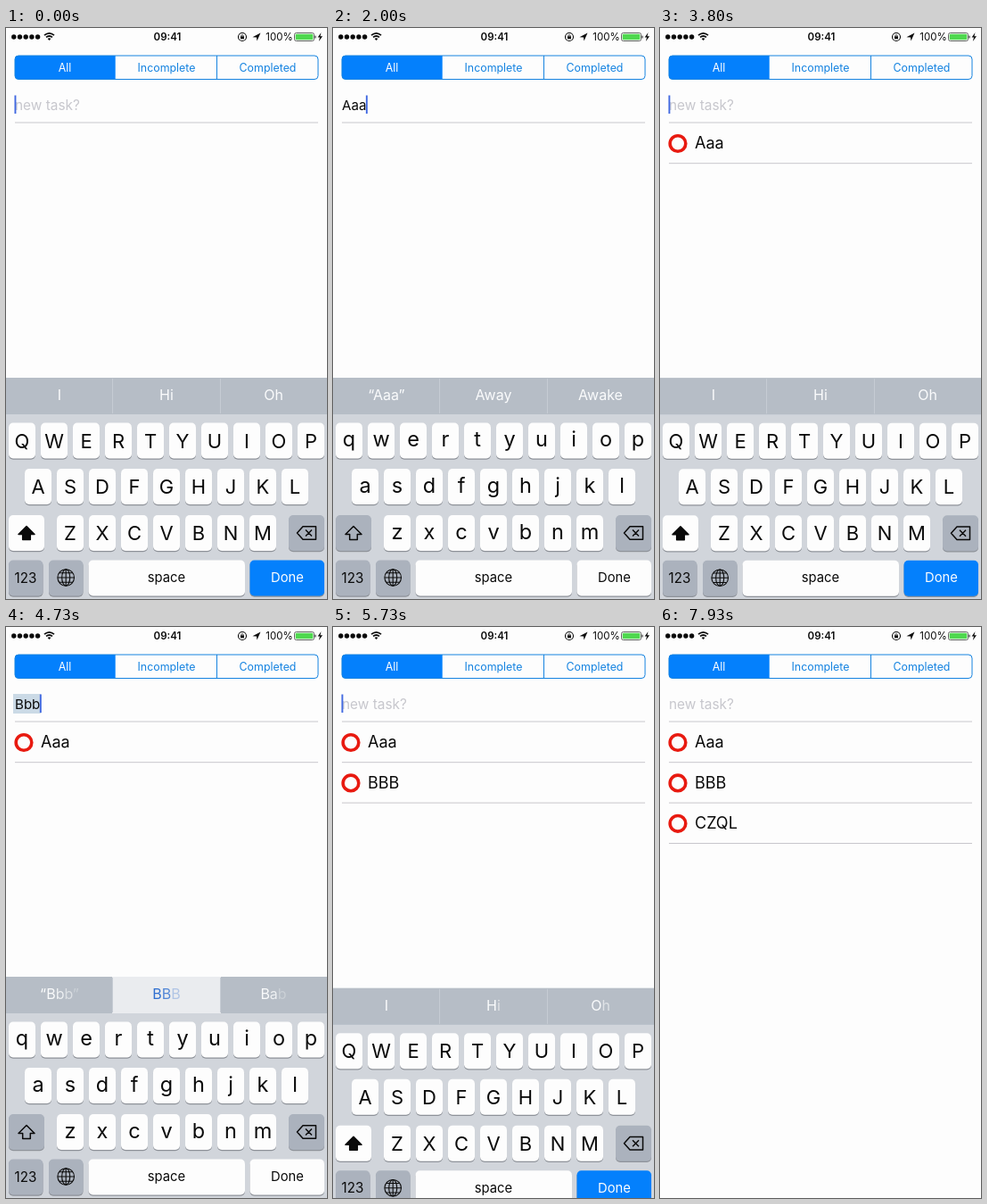
Animation, 360 px wide and 640 px high, one loop 8000 ms. Source, as an HTML page:

```html
<!DOCTYPE html>
<html lang="en">
<head>
<meta charset="utf-8">
<title>Task list</title>
<style>
  html, body { margin: 0; width: 100%; height: 100%; overflow: hidden; background: #fdfdfd; }
  svg { display: block; width: 360px; height: 640px; font-family: Inter, Roboto, sans-serif; }
</style>
</head>
<body>
<svg id="stage" viewBox="0 0 360 640"></svg>
<script>
const LOOP = 8000, KB_TOP = 392, KB_TRAVEL = 250, ROW_PITCH = 45.4;
const BLUE = '#0480fc', TINT = '#1583e0', INK = '#0a0a0a', KEY = '#fdfdfd', GREY = '#abb2bd', HINT = '#fafbfc';
const stage = document.getElementById('stage');

function add(parent, tag, attrs, content) {
  const node = document.createElementNS('http://www.w3.org/2000/svg', tag);
  for (const name in attrs) node.setAttribute(name, attrs[name]);
  if (content !== undefined) node.textContent = content;
  parent.append(node);
  return node;
}
const set = (node, attrs) => { for (const name in attrs) node.setAttribute(name, attrs[name]); };
const show = (node, on) => set(node, { visibility: on ? 'visible' : 'hidden' });
const clamp = v => Math.max(0, Math.min(1, v));
const rect = (parent, x, y, width, height, fill, more = {}) =>
  add(parent, 'rect', { x, y, width, height, fill, ...more });
const label = (parent, x, y, size, fill, content, more = {}) =>
  add(parent, 'text', { x, y, 'font-size': size, fill, 'text-anchor': 'middle', ...more }, content);
const path = (parent, d, more = {}) =>
  add(parent, 'path', { d, fill: 'none', stroke: INK, 'stroke-width': 1.5, 'stroke-linejoin': 'round', ...more });
const left = { 'text-anchor': 'start' };

function drawStatusBar() {
  for (let i = 0; i < 5; i++) add(stage, 'circle', { cx: 8.8 + i * 6.7, cy: 10, r: 2.7, fill: INK });
  path(stage, 'M43 8.2Q48.5 3.6 54 8.2M45 10.4Q48.5 7.6 52 10.4', { 'stroke-width': 1.7 });
  path(stage, 'M46.6 12Q48.5 10.7 50.4 12L48.5 14Z', { fill: INK, stroke: 'none' });
  label(stage, 181, 14, 11.5, INK, '09:41', { 'font-weight': 600 });
  add(stage, 'circle', { cx: 265, cy: 10, r: 4.5, fill: 'none', stroke: INK, 'stroke-width': 1.1 });
  rect(stage, 263, 9.3, 4, 3, INK);
  path(stage, 'M263.8 9.5V8.4Q265 6.8 266.2 8.4V9.5', { 'stroke-width': .8 });
  path(stage, 'M276.5 10.2L285.5 5.5L281.5 14.5L281 10.6Z', { fill: INK, stroke: 'none' });
  label(stage, 306.5, 14, 11.5, INK, '100%');
  rect(stage, 323.5, 5.5, 22, 9, 'none', { rx: 2, stroke: '#555', 'stroke-width': .9 });
  rect(stage, 324.7, 6.7, 19.6, 6.6, '#4fd84f', { rx: 1 });
  rect(stage, 346.3, 8.5, 1.4, 3, '#555', { rx: .6 });
  path(stage, 'M353.5 5L349.6 10.6H352L350.8 15L355 9.2H352.4Z', { fill: INK, stroke: 'none' });
}

function drawTabs() {
  path(stage, 'M122.7 31H14Q10 31 10 35V53.5Q10 57.5 14 57.5H122.7Z', { fill: BLUE, stroke: 'none' });
  rect(stage, 10, 31, 340, 26.5, 'none', { rx: 4, stroke: TINT, 'stroke-width': 1 });
  path(stage, 'M236.5 31V57.5', { stroke: TINT, 'stroke-width': 1 });
  label(stage, 66, 48.5, 12.4, KEY, 'All');
  label(stage, 180, 48.5, 12.4, TINT, 'Incomplete');
  label(stage, 293.5, 48.5, 12.4, TINT, 'Completed');
}

const rule = (parent, y) => path(parent, `M10 ${y}H350`, { stroke: '#c8c7cc', 'stroke-width': 1 });

drawStatusBar();
drawTabs();
rule(stage, 106);

const selection = rect(stage, 8, 75, 32, 22, '#cbdae6');
const placeholder = label(stage, 10, 91.5, 15.4, '#c7c7cd', 'new task?', left);
const field = label(stage, 10, 92, 15.1, INK, '', left);
const cursor = rect(stage, 9.5, 75.5, 1.9, 20.5, '#4169e1');

const tasks = [['Aaa', 2100], ['BBB', 4850], ['CZQL', 7430]].map(([name, time], i) => {
  const group = add(stage, 'g', {}), y = i * ROW_PITCH;
  add(group, 'circle', { cx: 20, cy: 129.5 + y, r: 8.8, fill: 'none', stroke: '#e81a10', 'stroke-width': 3.6 });
  label(group, 39, 135.3 + y, 18, INK, name, left);
  rule(group, 151.7 + y);
  return { group, time };
});

// Keyboard
const board = add(stage, 'g', {});
rect(board, 0, KB_TOP, 360, 250, '#d1d5db');
rect(board, 0, KB_TOP, 360, 41, '#b6bdc6');
const picked = rect(board, 119, KB_TOP, 122, 41, '#eaecef');
for (const x of [119.5, 240.5]) path(board, `M${x} 393V432`, { stroke: '#c6ccd4', 'stroke-width': 1 });
const hints = [60, 180, 300].map(x => label(board, x, 417, 16, HINT, ''));

function drawKey(x, y, width, fill = KEY) {
  rect(board, x, y + 1.2, width, 40, '#8e9299', { rx: 5 });
  return rect(board, x, y, width, 40, fill, { rx: 5 });
}
const letters = {};
['QWERTYUIOP', 'ASDFGHJKL', 'ZXCVBNM'].forEach((row, r) => {
  const first = [18, 36, 72][r], top = [442.5, 494, 546][r];
  [...row].forEach((char, i) => {
    const x = first + i * 36;
    drawKey(x - 15, top, 30);
    letters[char] = { x, top, node: label(board, x, top + 28, 22, INK, char) };
  });
});
const shiftKey = drawKey(3, 546, 40);
const shiftIcon = path(board, 'M23 558.5L32 567.5H27.3V573.5H18.7V567.5H14Z');
drawKey(317, 546, 40, GREY);
path(board, 'M333 558.8H347.5V573.2H333L326.5 566ZM336 562.5L343 569.5M343 562.5L336 569.5');
drawKey(3, 596.5, 38.5, GREY);
label(board, 22, 621.5, 15.2, INK, '123');
drawKey(48, 596.5, 38.5, GREY);
add(board, 'circle', { cx: 67.2, cy: 616, r: 9.3, fill: 'none', stroke: INK, 'stroke-width': 1.1 });
add(board, 'ellipse', { cx: 67.2, cy: 616, rx: 4.5, ry: 9.3, fill: 'none', stroke: INK, 'stroke-width': 1.1 });
path(board, 'M67.2 606.7V625.3M58 616H76.5M60 610.7H74.4M60 621.3H74.4', { 'stroke-width': 1.1 });
drawKey(92.5, 596.5, 175.5);
label(board, 180, 621, 14.8, INK, 'space');
const doneKey = drawKey(273.5, 596.5, 83.5, BLUE);
const doneText = label(board, 315.5, 621, 14.8, KEY, 'Done');

// Enlarged key, drawn around the centre of the key and its top edge
const popup = add(board, 'g', {});
const balloon = 'M-21 -62H21Q27 -62 27 -56V-17Q27 -9 21 -3Q15 3 15 9V35Q15 40 10 40H-10Q-15 40 -15 35V9Q-15 3 -21 -3Q-27 -9 -27 -17V-56Q-27 -62 -21 -62Z';
path(popup, balloon, { fill: '#8e9299', stroke: 'none', opacity: .55, transform: 'translate(0 1.5)' });
path(popup, balloon, { fill: KEY, stroke: '#bfc3ca', 'stroke-width': .6 });
const popupText = label(popup, .5, -21, 37, INK, '', { 'font-weight': 300 });

// Each step overrides part of the state from its time on
const START = ['I', 'Hi', 'Oh'];
const steps = [
  [0, { text: '', caps: true, pop: '', pressed: false, pick: false, focus: true, hints: START, since: -500 }],
  [620, { pop: 'A' }], [700, { text: 'A', caps: false, hints: ['“A”', 'An', 'Am'] }], [770, { pop: '' }],
  [1000, { pop: 'a' }], [1070, { text: 'Aa', hints: ['“Aa”', 'As', 'Am'] }], [1140, { pop: '' }],
  [1330, { pop: 'a' }], [1400, { text: 'Aaa', hints: ['“Aaa”', 'Away', 'Awake'] }], [1470, { pop: '' }],
  [1930, { pressed: true }],
  [2060, { pressed: false, text: '', focus: false }],
  [3070, { focus: true, caps: true }],
  [3200, { hints: ['“A”', 'An', 'Aw'] }], [3420, { hints: START }],
  [3900, { pop: 'B' }], [3970, { text: 'B', caps: false, hints: ['“B”', 'But', 'Be'] }], [4040, { pop: '' }],
  [4150, { pop: 'b' }], [4220, { text: 'Bb', hints: ['“Bb”', 'Be', 'By'] }], [4290, { pop: '' }],
  [4400, { pop: 'b' }], [4480, { text: 'Bbb' }], [4550, { pop: '' }],
  [4600, { hints: ['“Bbb”', 'BBB', 'Bab'], pick: true }], [4680, { pressed: true }],
  [4800, { pressed: false, pick: false, text: '', focus: false }],
  [5360, { focus: true, caps: true }], [5570, { hints: START }],
  [6420, { pop: 'C' }], [6490, { text: 'C', caps: false }], [6560, { pop: '' }],
  [6670, { pop: 'c', hints: ['“C”', 'Check', 'Can'] }], [6760, { text: 'Cc' }], [6840, { pop: '' }],
  [6950, { pop: 'c', hints: ['“Cc”', 'Cc', 'Can'] }], [7020, { text: 'Ccc' }], [7090, { pop: '' }],
  [7130, { hints: ['“Ccc”', 'CZQL', 'Cab'], pick: true }], [7260, { pressed: true }],
  [7380, { pressed: false, pick: false, text: '', focus: false }],
];
const slides = [[2060, 1], [3134, 0], [4800, 1], [5394, 0], [7380, 1]];

function stateAt(t) {
  const state = {};
  for (const [time, change] of steps) {
    if (time > t) break;
    if (change.hints) state.since = time;
    Object.assign(state, change);
  }
  return state;
}

// Critically damped settling, as the keyboard moves
function boardOffset(t) {
  const slide = slides.filter(([time]) => time <= t).pop();
  if (!slide) return 0;
  const p = (t - slide[0]) / 1000 * (slide[1] ? 16 : 14);
  const rest = (1 + p) * Math.exp(-p);
  return KB_TRAVEL * (slide[1] ? 1 - rest : rest);
}

function drawHints(state, t) {
  const progress = (t - state.since) / 200;
  hints.forEach((node, h) => {
    const word = state.hints[h];
    if (node.textContent !== word) {
      node.textContent = '';
      for (const char of word) add(node, 'tspan', {}, char);
    }
    [...node.children].forEach((span, i) =>
      set(span, { 'fill-opacity': clamp(progress * 2 - i / Math.max(1, word.length - 1)) }));
  });
  set(hints[1], { fill: state.pick ? '#2f6fd0' : HINT });
  show(picked, state.pick);
}

let wasCaps;
function drawCase(caps) {
  if (caps === wasCaps) return;
  wasCaps = caps;
  for (const char in letters) {
    const { node, top } = letters[char];
    node.textContent = caps ? char : char.toLowerCase();
    set(node, { y: top + (caps ? 28 : 26.8), 'font-size': caps ? 22 : 23.5 });
  }
  set(shiftKey, { fill: caps ? KEY : GREY });
  set(shiftIcon, { fill: caps ? INK : 'none' });
}

function render(t) {
  const state = stateAt(t);
  field.textContent = state.text;
  const width = state.text ? field.getComputedTextLength() : 0;
  show(placeholder, !state.text);
  show(cursor, state.focus);
  set(cursor, { x: 9.5 + width });
  show(selection, state.pick);
  set(selection, { width: width + 3 });
  for (const { group, time } of tasks) set(group, { opacity: clamp((t - time) / 250) });

  set(board, { transform: `translate(0 ${boardOffset(t).toFixed(2)})` });
  drawHints(state, t);
  drawCase(state.caps);
  set(doneKey, { fill: state.pressed ? KEY : BLUE });
  set(doneText, { fill: state.pressed ? INK : KEY });
  show(popup, state.pop);
  if (state.pop) {
    const { x, top } = letters[state.pop.toUpperCase()];
    set(popup, { transform: `translate(${x} ${top})` });
    popupText.textContent = state.pop;
  }
}

const begin = performance.now();
function tick() {
  render((performance.now() - begin) % LOOP);
  requestAnimationFrame(tick);
}
tick();
</script>
</body>
</html>
```
